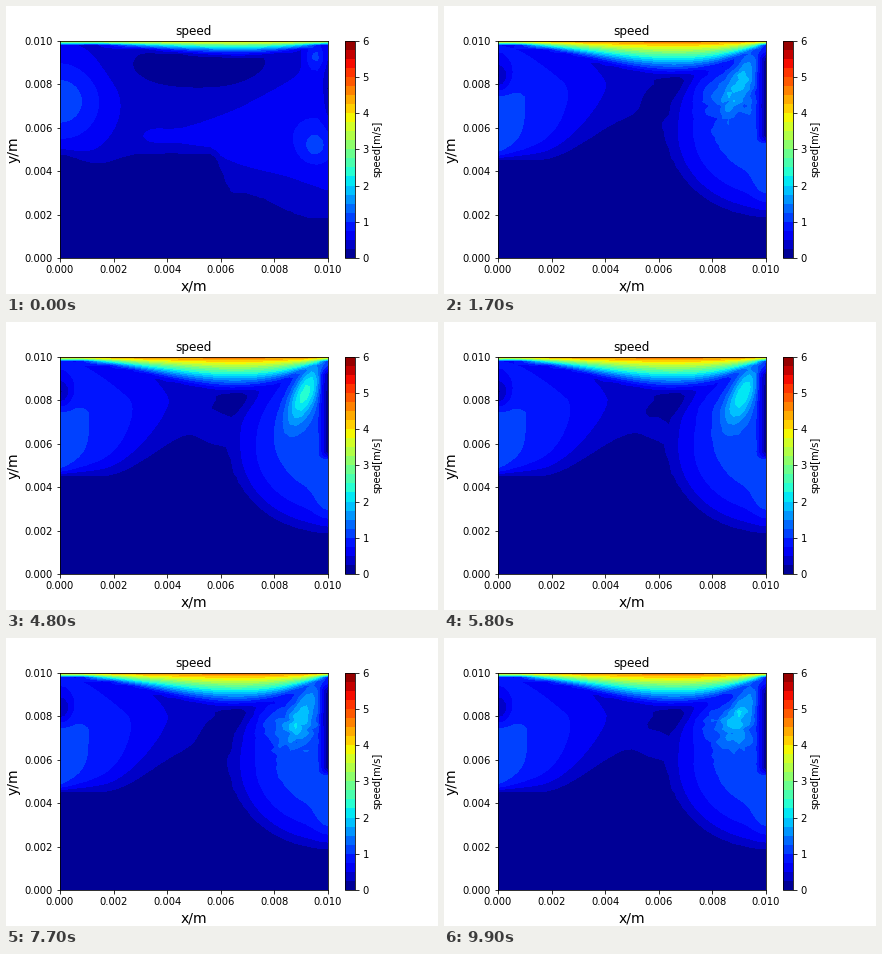
Animation, 432 px wide and 288 px high, one loop 10000 ms. Source, as a matplotlib script:

```python
import numpy as np
import matplotlib.pyplot as plt
from matplotlib.animation import FuncAnimation

FRAMES = 100
SIZE = 0.01
LEVELS = np.linspace(0, 6, 25)

plt.rcParams.update({"font.family": "DejaVu Sans", "font.size": 10})
fig = plt.figure(figsize=(6, 4), dpi=72)
fig.subplots_adjust(left=0.125, right=0.9, bottom=0.125, top=0.88)
ax = fig.add_subplot()

u, v = np.meshgrid(np.linspace(0, 1, 51), np.linspace(0, 1, 51))
# Flow features are laid out in stage pixels, y pointing down.
x = 54 + 267.84 * u
y = 252 - 217.44 * v


def smooth(s, start, end):
    q = np.clip((s - start) / (end - start), 0, 1)
    return q * q * (3 - 2 * q)


def blob(cx, cy, sx, sy, tilt=0.0):
    dx, dy = x - cx, y - cy
    c, s = np.cos(tilt), np.sin(tilt)
    return np.exp(-((c * dx + s * dy) / sx) ** 2 - ((c * dy - s * dx) / sy) ** 2)


def lid(top, depth, power):
    """Shear layer under the moving lid, thickest right of the middle."""
    reach = 4 + depth * np.sin(np.pi * u ** 1.65)
    return top * (1 - np.clip((y - 34.56) / reach, 0, 1)) ** power


def blend(*parts):
    return sum(np.clip(p, 0, None) ** 5 for p in parts) ** 0.2


def early_flow():
    edge = (147 + 10 * blob(92, y, 25, 1) + 40 * smooth(x, 205, 228)
            + 25 * smooth(x, 235, 310))
    mid = 130 - 18 * smooth(x, 225, 322)
    half = 7 + 68 * np.clip((x - 170) / 150, 0, 1) ** 1.3
    body = 0.36 + 0.8 * blob(54, 95, 46, 45)
    body -= 0.3 * blob(192, 60, 77, 22)
    body += 0.35 * np.exp(-((y - mid) / half) ** 2) * smooth(x, 128, 152)
    body += 0.45 * blob(309, 140, 16, 18) + 0.6 * blob(309, 50, 9, 14)
    body *= 1 - 0.7 * blob(322, 85, 5, 30)
    body = 0.25 + (body - 0.25) * np.tanh((edge - y) / 7)
    body = np.where(y > edge + 3, 0.03, body)
    return blend(body, lid(4.2, 17, 1.9))


def left_lobe():
    edge = 153.5 - 46 * smooth(x, 95, 200) + 0.02 * np.clip(x - 195, 0, None) ** 2
    width = 6 + 0.28 * (x - 54)
    g = 1 - 0.0054 * (x - 82) - 0.006 * np.clip(80 - y, 0, None)
    g -= 0.14 * smooth(y, 90, 82) * np.exp(-(x - 54) / 30)
    g *= 1 - 0.8 * blob(54, 70, 12, 15)
    rise = 0.25 + np.clip(g - 0.25, 0.1, None) * np.tanh((edge - y) / width)
    return np.minimum(g, rise)


def right_lobe():
    height = np.where(y > 125, 85, 106)
    inside = 1 - ((322 - x) / 97) ** 2 - ((y - 125) / height) ** 2
    body = 0.25 + 0.95 * np.sign(inside) * np.abs(inside) ** 0.8
    return body + 0.3 * blob(322, 178, 12, 20)


EARLY = early_flow()
LEFT = left_lobe()
RIGHT = right_lobe()
LID = lid(4.75, 38, 1.4)
JET = blob(300, 69, 12, 34, 0.42)
FAN = blob(276, 86, 24, 17)
RAGGED = blob(288, 92, 28, 30)
BRIDGE = blob(211, 103, 19, 15)
POCKET = blob(228, 81, 24, 10, -0.35)
WALL = 1 - 0.95 * np.exp(-((322 - x) / 7) ** 2) * smooth(y, 42, 54) * smooth(y, 139, 132)


def speed(i):
    t = i / 10
    calm = np.exp(-((t - 4.8) / 1.7) ** 2)
    rough = 1 - calm
    sway = np.cos(2 * np.pi * (t - 4.8) / 4.4)
    noise = np.random.default_rng(i).standard_normal(x.shape)
    right = (RIGHT + (0.8 + 0.65 * calm) * JET + 0.4 * rough * FAN
             + 0.14 * rough ** 1.5 * RAGGED * noise)
    late = blend(LEFT, right * WALL, LID)
    late += 0.13 * sway * BRIDGE - 0.2 * POCKET
    late += 0.006 * np.sin(0.5 * i + x / 40) * (late > 0.1)
    k = 1 - np.exp(-i / 4)
    return np.clip((1 - k) * EARLY + k * late, 0, 5.99)


def fill(i):
    return ax.contourf(u * SIZE, v * SIZE, speed(i), levels=LEVELS, cmap="jet")


field = fill(0)
ticks = np.linspace(0, SIZE, 6)
ax.set(xlim=(0, SIZE), ylim=(0, SIZE), xticks=ticks, yticks=ticks)
ax.xaxis.set_major_formatter("{x:.3f}")
ax.yaxis.set_major_formatter("{x:.3f}")
ax.set_title("speed", fontsize=12)
ax.set_xlabel("x/m", fontsize=14)
ax.set_ylabel("y/m", fontsize=14)
fig.colorbar(field, ax=ax, ticks=range(7), label="speed[m/s]")


def update(i):
    global field
    field.remove()
    field = fill(i)
    return [field]


anim = FuncAnimation(fig, update, frames=FRAMES, init_func=lambda: [],
                     interval=100, repeat=True, repeat_delay=0)
plt.show()
```
